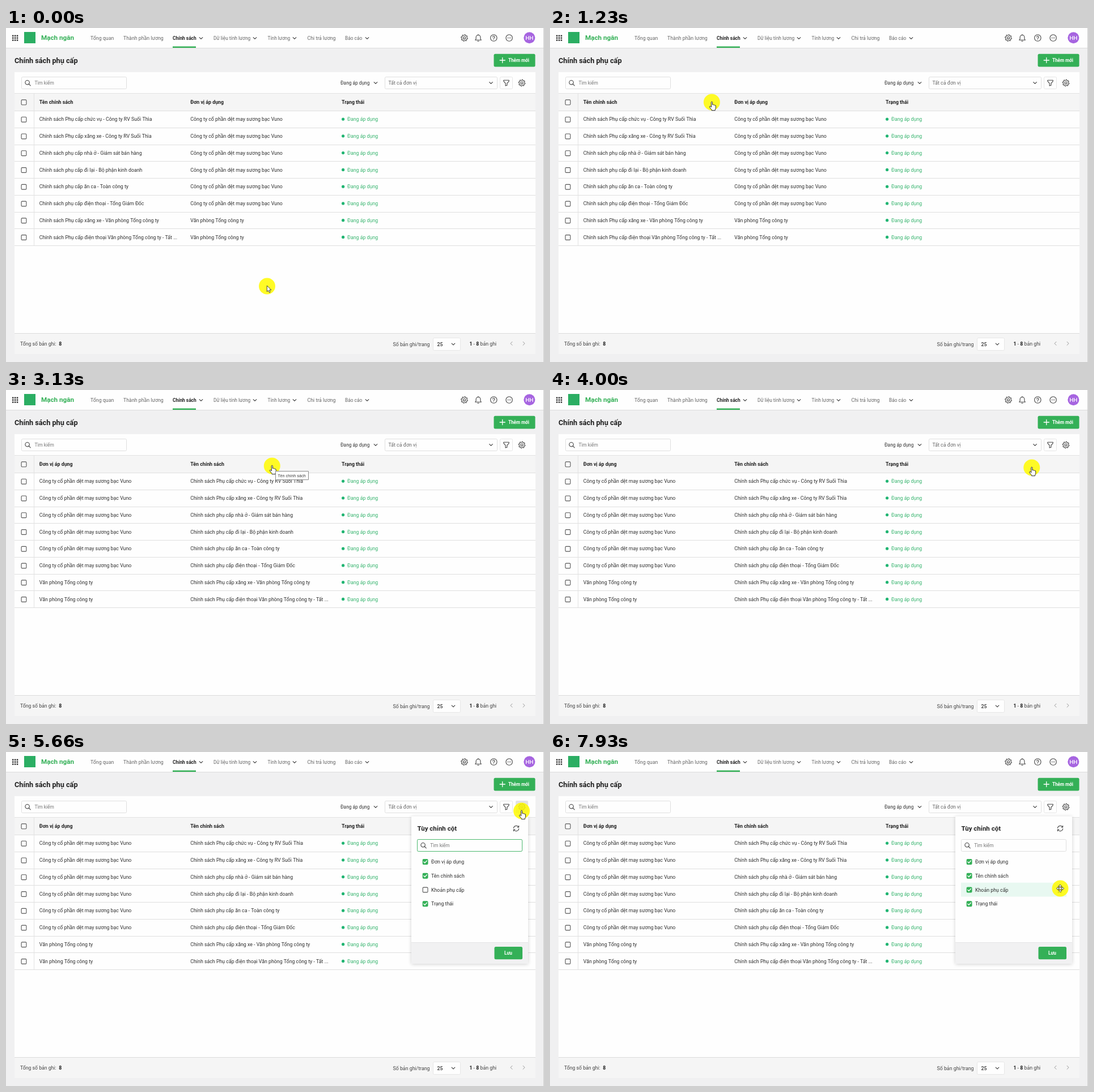
An HTML page with a canvas for the animation above (8000 ms loop, 949 px wide and 590 px high).

```html
<!DOCTYPE html>
<html lang="vi">
<head>
<meta charset="utf-8">
<title>Chính sách phụ cấp</title>
<style>
html, body { margin: 0; width: 100%; height: 100%; overflow: hidden; background: #f0f0f1; }
canvas { display: block; width: 949px; height: 590px; }
</style>
</head>
<body>
<canvas id="stage" width="949" height="590"></canvas>
<script>
const ctx = document.getElementById('stage').getContext('2d');
const LOOP = 8000;
const GREEN = '#34b057', INK = '#2f2f2f', GREY = '#666', LINE = '#dfdfdf', WHITE = '#fefefe', MINT = '#e8f8f1';

const DRAG_START = 1330, BAR_ON = 1830, DROP = 2560;
const TIP_ON = 3130, TIP_OFF = 3600;
const PANEL_ON = 5430, PANEL_FULL = 5660, CHECKED = 6930, BLURRED = 7060;

// Pointer path: time, x, y
const PATH = [
  [0, 460.5, 456], [30, 460.5, 456], [800, 199, 136], [860, 199, 136], [960, 201, 133],
  [1100, 201, 133], [1230, 285, 131], [1660, 411, 134], [1800, 411, 134], [1860, 460.5, 134],
  [2030, 460.5, 134], [2130, 469.3, 134], [3600, 469.3, 134], [4000, 849.5, 137], [4400, 906, 106],
  [4430, 906, 106], [4500, 909, 103], [4730, 909, 103], [5100, 915, 98], [5530, 909.5, 104],
  [6100, 909.5, 104], [6730, 743, 242], [6930, 743, 241.5], [7330, 743, 241.5],
  [7630, 828, 247], [7930, 900, 241], [8000, 900, 241]
];

const COMPANY = 'Công ty cổ phần dệt may sương bạc Vuno', OFFICE = 'Văn phòng Tổng công ty';
const POLICIES = [
  'Chính sách Phụ cấp chức vụ - Công ty RV Suối Thìa',
  'Chính sách Phụ cấp xăng xe - Công ty RV Suối Thìa',
  'Chính sách phụ cấp nhà ở - Giám sát bán hàng',
  'Chính sách phụ cấp đi lại - Bộ phận kinh doanh',
  'Chính sách phụ cấp ăn ca - Toàn công ty',
  'Chính sách phụ cấp điện thoại - Tổng Giám Đốc',
  'Chính sách Phụ cấp xăng xe - Văn phòng Tổng công ty',
  'Chính sách Phụ cấp điện thoại Văn phòng Tổng công ty - Tất ...'
];
const OPTIONS = ['Đơn vị áp dụng', 'Tên chính sách', 'Khoản phụ cấp', 'Trạng thái'];
const ROW_TOP = 146.3, ROW_H = 29.76;

const clamp = v => Math.max(0, Math.min(1, v));
const inside = (p, x, y, w, h) => p.x >= x && p.x < x + w && p.y >= y && p.y < y + h;

// Monotone cubic interpolation through the path
function pathAt(t, axis) {
  const slope = i => (PATH[i + 1][axis] - PATH[i][axis]) / (PATH[i + 1][0] - PATH[i][0]);
  const tangent = i => {
    if (i === 0 || i === PATH.length - 1) return 0;
    const a = slope(i - 1), b = slope(i);
    return a * b > 0 ? 2 * a * b / (a + b) : 0;
  };
  let i = 0;
  while (i < PATH.length - 2 && t >= PATH[i + 1][0]) i++;
  const [a, b] = [PATH[i], PATH[i + 1]];
  const d = b[0] - a[0], u = (t - a[0]) / d, v = 1 - u;
  return a[axis] * (1 + 2 * u) * v * v + b[axis] * u * u * (3 - 2 * u)
    + d * u * v * (tangent(i) * v - tangent(i + 1) * u);
}

function text(str, x, midY, color = INK, size = 8.8, weight = 400) {
  ctx.font = `${weight} ${size}px Roboto, sans-serif`;
  ctx.fillStyle = color;
  ctx.fillText(str, x, midY + size * 0.355);
}

function rect(x, y, w, h, fill, stroke, r = 0, lw = 1) {
  ctx.beginPath();
  ctx.roundRect(x, y, w, h, r);
  if (fill) { ctx.fillStyle = fill; ctx.fill(); }
  if (stroke) { ctx.strokeStyle = stroke; ctx.lineWidth = lw; ctx.stroke(); }
}

function dot(x, y, r, fill) {
  ctx.beginPath();
  ctx.arc(x, y, r, 0, Math.PI * 2);
  ctx.fillStyle = fill;
  ctx.fill();
}

function icon(d, x, y, stroke = '#444', lw = 1.1, fill) {
  const p = new Path2D(d);
  ctx.save();
  ctx.translate(x, y);
  ctx.lineJoin = ctx.lineCap = 'round';
  if (fill) { ctx.fillStyle = fill; ctx.fill(p); }
  if (stroke) { ctx.strokeStyle = stroke; ctx.lineWidth = lw; ctx.stroke(p); }
  ctx.restore();
}

const ring = r => `M${r} 0A${r} ${r} 0 1 1 ${-r} 0A${r} ${r} 0 1 1 ${r} 0`;
const chevron = (x, y) => icon('M-2.8-1.4L0 1.4L2.8-1.4', x, y, '#444', 1.2);
const search = (x, y) => icon('M2.8-.8A3.7 3.7 0 1 1-4.6-.8A3.7 3.7 0 1 1 2.8-.8M1.8 1.9L4.7 4.8', x, y, '#444', 1.15);

function gear(x, y) {
  let d = '';
  for (let i = 0; i < 32; i++) {
    const a = (i + 0.5) * Math.PI / 16, r = i % 4 < 2 ? 5.8 : 4.5;
    d += (i ? 'L' : 'M') + (r * Math.cos(a)).toFixed(2) + ' ' + (r * Math.sin(a)).toFixed(2);
  }
  icon(d + 'Z' + ring(2), x, y, '#444', 1.1);
}

function checkbox(x, y, on) {
  rect(x - 4.4, y - 4.4, 8.8, 8.8, on ? GREEN : WHITE, on ? GREEN : '#555', 1.4, 1.1);
  if (on) icon('M-2.7 0L-.8 2L2.8-2', x, y, '#fff', 1.3);
}

function topBar() {
  rect(0, 0, 949, 35, WHITE);
  rect(0, 35, 949, 1, '#dcdcdc');
  for (let i = 0; i < 9; i++) rect(11 + i % 3 * 3.9, 12.5 + (i / 3 | 0) * 3.9, 2.5, 2.5, '#333');
  rect(32, 7, 20, 20, '#2bae63');
  text('Mạch ngân', 62, 17.3, GREEN, 11.7, 700);
  text('Tổng quan', 149, 17.5, GREY);
  text('Thành phần lương', 207, 17.5, GREY);
  text('Chính sách', 294, 18, '#222', 8.35, 700);
  text('Dữ liệu tính lương', 366, 18, GREY, 8.35);
  text('Tính lương', 461.5, 18, GREY, 8.35);
  text('Chi trả lương', 531.5, 17.5, GREY);
  text('Báo cáo', 598, 18, GREY, 8.35);
  [344, 439, 509, 637].forEach(x => chevron(x, 18));
  rect(294, 32.5, 41, 2.5, GREEN);
  gear(808.5, 17.5);
  icon('M-5.3 3.8H5.3L3.9 1.8V-1.2A3.9 3.9 0 0 0-3.9-1.2V1.8ZM-1.3 5.8H1.3M0-5.2V-6', 833, 17.5);
  icon(ring(5.7) + 'M-1.7-1.5A1.7 1.7 0 1 1 .8 0Q0 .5 0 1.3M0 3.1V3.2', 860.3, 17.5);
  icon(ring(5.7), 887.6, 17.5);
  [-2.4, 0, 2.4].forEach(dx => dot(887.6 + dx, 17.5, 0.75, '#444'));
  dot(923.3, 17.3, 10, '#a664e0');
  text('HH', 916.2, 17.5, '#fff', 9.9, 500);
}

function toolbar(hot) {
  text('Chính sách phụ cấp', 15, 57.3, '#1f1f1f', 12.7, 700);
  rect(860.5, 45.7, 73, 22.8, GREEN, null, 2.5);
  icon('M-4.6 0H4.6M0-4.6V4.6', 875.7, 57, '#fff', 1.3);
  text('Thêm mới', 886, 57.3, '#fff', 8.15, 700);

  rect(15, 78, 919, 498, WHITE);
  rect(27.5, 86.5, 185, 21, WHITE, LINE, 2);
  search(38.5, 97);
  text('Tìm kiếm', 50.5, 97.2, '#777', 8.3);
  text('Đang áp dụng', 590, 97.2, INK, 8.35);
  chevron(652, 97);
  rect(668.5, 86.5, 198, 21, WHITE, LINE, 2);
  text('Tất cả đơn vị', 674.5, 96.8, GREY);
  chevron(855.5, 97);
  rect(871.5, 86.5, 22, 21, WHITE, '#e6e6e6', 2);
  icon('M-4.7-4.7H4.7V-3.2L1.4 .8V4.2L-1.4 5V.8L-4.7-3.2Z', 882.5, 97);
  if (hot) rect(899, 86, 22, 22, '#e2e2e2', null, 2);
  gear(910, 97);
}

function table(t, pointer, panelOpen) {
  const dragging = t >= DRAG_START && t < DROP, swapped = t >= DROP;
  const nameX = swapped ? 325.3 : 58.8, unitX = swapped ? 58.8 : 325.3;
  const nameInk = dragging ? '#a0a0a0' : INK;

  rect(15, 115.5, 919, 31, '#f5f5f5');
  rect(15, 115, 919, 1, '#e2e2e2');
  checkbox(31.5, 131.3);
  text('Tên chính sách', nameX, 130.5, dragging ? '#8d8d8d' : '#222', 8.8, dragging ? 500 : 700);
  text('Đơn vị áp dụng', unitX, 130.5, '#222', 8.8, 700);
  text('Trạng thái', 592, 130.5, '#222', 8.8, 700);

  const overPanel = panelOpen && inside(pointer, 715, 113, 206, 261);
  POLICIES.forEach((name, i) => {
    const top = ROW_TOP + i * ROW_H, mid = top + 15;
    if (!overPanel && inside(pointer, 15, top, 919, ROW_H)) rect(15, top, 919, ROW_H, MINT);
    checkbox(31.5, mid + 0.4);
    text(name, nameX, mid, nameInk);
    text(i < 6 ? COMPANY : OFFICE, unitX, mid);
    dot(594.6, mid - 0.2, 2.6, '#22b573');
    text('Đang áp dụng', 602, mid, '#36b46e');
  });
  for (let i = 0; i <= 8; i++) rect(15, Math.round(ROW_TOP + i * ROW_H - 0.3), 919, 1, LINE);
  rect(49, 116, 1, 268, '#e2e2e2');

  rect(15, 539.5, 919, 36.5, '#f5f5f5');
  rect(15, 539, 919, 1, '#dcdcdc');
  text('Tổng số bản ghi:', 25, 558, '#444', 8.7);
  text('8', 93.3, 558, '#222', 8.8, 700);
  text('Số bản ghi/trang', 682.5, 558.5, '#444');
  rect(753.5, 547.5, 48, 22, WHITE, '#e6e6e6', 2);
  text('25', 760.5, 559, '#333', 8.8, 500);
  chevron(789, 558.5);
  text('1', 817.5, 558, '#222', 8.8, 700);
  text('-', 824.5, 558, '#444');
  text('8', 829.2, 558, '#222', 8.8, 700);
  text('bản ghi', 836.5, 558, '#444');
  icon('M1.5-3L-1.5 0L1.5 3', 891.5, 557.3, '#999', 1);
  icon('M-1.5-3L1.5 0L-1.5 3', 913.5, 557.3, '#999', 1);

  if (dragging) {
    if (t >= BAR_ON) rect(575, 116, 7, 423, '#99bbdc');
    const x = Math.round(pointer.x - 122) + 0.5, y = Math.round(pointer.y - 21) + 0.5;
    rect(x, y, 246, 28.5, WHITE, '#9aa9cc');
    text('Tên chính sách', x + 4.8, y + 10.3, '#8d8d8d');
  }
}

function panel(t, pointer) {
  ctx.save();
  ctx.globalAlpha = clamp((t - PANEL_ON) / (PANEL_FULL - PANEL_ON));
  ctx.save();
  ctx.shadowColor = 'rgba(0,0,0,.18)';
  ctx.shadowBlur = 6;
  ctx.shadowOffsetY = 1;
  rect(715, 113.5, 206, 260.5, WHITE, null, 2);
  ctx.restore();
  text('Tùy chỉnh cột', 725.5, 134.8, '#222', 11.5, 700);
  icon('M-4.6-.5A4.7 4.7 0 0 1 4-2.5M4.6-4.8V-2H1.8M4.6 .5A4.7 4.7 0 0 1-4 2.5M-4.6 4.8V2H-1.8', 900, 135, '#444', 1.05);

  rect(725.5, 154.5, 185, 21, WHITE, LINE, 2);
  ctx.save();
  ctx.globalAlpha *= 1 - clamp((t - CHECKED) / (BLURRED - CHECKED));
  rect(725.5, 154.5, 185, 21, null, '#4cb96e', 2);
  ctx.restore();
  search(736.5, 165);
  text('Tìm kiếm', 748.3, 165.2, '#777', 8.3);

  OPTIONS.forEach((label, i) => {
    const y = 193.9 + i * 24.75;
    if (inside(pointer, 725, y - 12.4, 186, 24.75)) {
      rect(725, y - 12.6, 186, 24.8, MINT);
      for (let k = 0; k < 6; k++) rect(895.6 + k % 2 * 4.6, y - 5.8 + (k >> 1) * 4.5, 2.5, 2.5, '#555');
    }
    checkbox(739.6, y + 0.1, i !== 2 || t >= CHECKED);
    text(label, 750, y);
  });

  rect(715, 336.5, 206, 37.5, '#f1f1f2', null, [0, 0, 2, 2]);
  rect(715, 336, 206, 1, '#e6e6e6');
  rect(861.5, 344, 49.5, 22.3, GREEN, null, 2.5);
  text('Lưu', 879, 355.5, '#fff', 8.2, 700);
  ctx.restore();
}

const ARROW = 'M0 0V10.2L2.4 8L4.1 11.8L5.9 11L4.2 7.3H7.3Z';
const HAND = 'M-1.1 .9A1.1 1.1 0 0 1 1.1 .9V5.2Q2.5 4.2 3.2 5.6Q4.6 4.8 5.2 6.2Q7 5.8 7 7.6V10.6Q7 12.4 5.8 13.6V15.3H-.2V14Q-2.4 11.8-3.9 9.2Q-4.2 7.5-2.5 7.8L-1.1 9.2Z';
const MOVE = 'M0-6.6L2.7-3.7H1V-1H3.7V-2.7L6.6 0L3.7 2.7V1H1V3.7H2.7L0 6.6L-2.7 3.7H-1V1H-3.7V2.7L-6.6 0L-3.7-2.7V-1H-1V-3.7H-2.7Z';

function cursorShape(p, hot, panelOpen) {
  if (panelOpen && inside(p, 715, 113, 206, 261)) {
    if (inside(p, 893, 181, 18, 99)) return MOVE;
    return inside(p, 725, 181, 168, 99) ? HAND : ARROW;
  }
  return hot || inside(p, 15, 116, 919, 268) ? HAND : ARROW;
}

function cursor(p, shape) {
  dot(p.x, p.y, 14.5, 'rgba(255,250,0,.85)');
  if (shape === HAND) icon(HAND, p.x, p.y - 0.6, '#222', 0.95, '#fff');
  else if (shape === MOVE) icon(MOVE, p.x, p.y, '#333', 0.9, '#fff');
  else icon(ARROW, p.x - 0.2, p.y - 0.5, '#333', 0.9, '#fff');
}

function draw(t) {
  const pointer = { x: pathAt(t, 1), y: pathAt(t, 2) };
  const hot = inside(pointer, 898, 86, 24, 22), panelOpen = t >= PANEL_ON;
  rect(0, 0, 949, 590, '#f0f0f1');
  topBar();
  toolbar(hot);
  rect(948, 0, 1, 590, '#cfcfcf');
  table(t, pointer, panelOpen);
  if (panelOpen) panel(t, pointer);
  cursor(pointer, cursorShape(pointer, hot, panelOpen));
  if (t >= TIP_ON && t < TIP_OFF) {
    rect(475.5, 143.5, 58, 15, WHITE, '#8a8a8a');
    text('Tên chính sách', 479.5, 151, '#444', 7.4);
  }
}

const start = performance.now();
function frame() {
  draw((performance.now() - start) % LOOP);
  requestAnimationFrame(frame);
}
frame();
</script>
</body>
</html>
```
